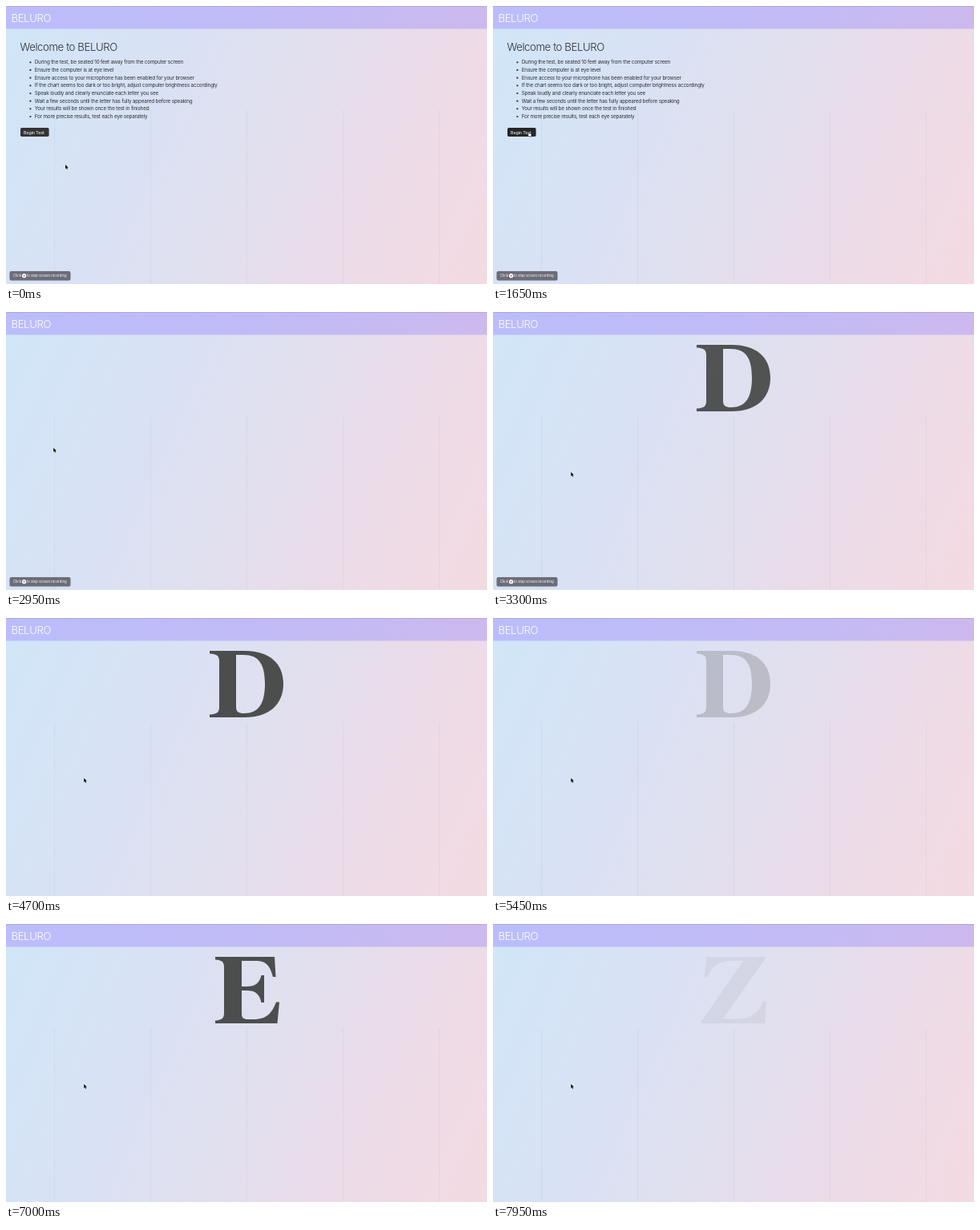
Animation of 600 by 347 pixels, one loop 8 s. Source, as an HTML page:

```html
<!DOCTYPE html>
<html lang="en">
<head>
<meta charset="utf-8">
<title>Vision test</title>
<style>
html, body { margin: 0; height: 100%; overflow: hidden; }
svg { display: block; width: 600px; height: 347px; font-family: Inter, "Open Sans", sans-serif; }
.title { font-size: 13.2px; font-weight: 300; letter-spacing: -.03em; }
.list { font-size: 6.3px; letter-spacing: -.024em; }
.button { font-size: 5.4px; letter-spacing: -.02em; }
.badge { font-size: 4.3px; }
</style>
</head>
<body>
<svg viewBox="0 0 600 347">
  <defs>
    <linearGradient id="sky" gradientUnits="userSpaceOnUse" x2="631" y2="278">
      <stop stop-color="#d0e6f8"/>
      <stop offset=".33" stop-color="#dae1f4"/>
      <stop offset=".5" stop-color="#e0e0ef"/>
      <stop offset=".7" stop-color="#eadcea"/>
      <stop offset="1" stop-color="#f4dae1"/>
    </linearGradient>
    <linearGradient id="bar">
      <stop stop-color="#bbbdfb"/>
      <stop offset=".5" stop-color="#c0bbf7"/>
      <stop offset="1" stop-color="#ccb9ee"/>
    </linearGradient>
  </defs>
  <rect width="600" height="347" fill="url(#sky)"/>
  <path d="M60.5 130V347M180.5 130V347M300.5 130V347M420.5 130V347M540.5 130V347" stroke="#556" stroke-opacity=".06"/>
  <rect width="600" height="28.5" fill="url(#bar)"/>
  <rect width="600" height=".7" fill="#667" opacity=".3"/>
  <text class="title" x="6.5" y="20" fill="#fff">BELURO</text>

  <g id="page" fill="#2b2d33">
    <text class="title" x="17.5" y="56">Welcome to BELURO</text>
    <g id="list" class="list"></g>
    <rect id="ring" x="17" y="151" width="37.6" height="13" rx="2.4" fill="none" stroke="#6a62e8" stroke-width="1.8"/>
    <rect id="button" x="18" y="152" width="35.6" height="11" rx="1.7"/>
    <text class="button" x="22" y="159.5" fill="#fff">Begin Test</text>
  </g>

  <path id="letter" fill="#4c4e4e" fill-rule="evenodd"/>

  <g id="badge">
    <rect x="4" y="330.7" width="77" height="12.6" rx="2.5" fill="#446" opacity=".15"/>
    <rect x="4.6" y="331" width="75.8" height="11.4" rx="2" fill="#6c6d78"/>
    <g class="badge" fill="#fff">
      <text x="9" y="338.3">Click</text>
      <circle cx="22.6" cy="336.7" r="2.6"/>
      <text x="26" y="338.3">to stop screen recording</text>
    </g>
    <circle cx="22.6" cy="336.7" r=".9" fill="#6c6d78"/>
  </g>

  <g id="cursor" stroke-linejoin="round">
    <path id="arrow" d="M0 0V5.3L1.2 4.2 2 6 3 5.6 2.2 3.8H3.8Z" fill="#111" stroke="#fff" stroke-width=".5" paint-order="stroke"/>
    <path id="hand" d="M.1.2Q.8-.5 1.3.4L1.7 2 4.2 2.5Q4.8 2.8 4.5 4L4.1 6H1.5L-.6 3.7Q-.4 2.9.6 3.5Z" fill="#fff" stroke="#111" stroke-width=".6"/>
  </g>
</svg>
<script>
const LOOP = 8000;
const $ = id => document.getElementById(id);
const lines = [
  "During the test, be seated 10 feet away from the computer screen",
  "Ensure the computer is at eye level",
  "Ensure access to your microphone has been enabled for your browser",
  "If the chart seems too dark or too bright, adjust computer brightness accordingly",
  "Speak loudly and clearly enunciate each letter you see",
  "Wait a few seconds until the letter has fully appeared before speaking",
  "Your results will be shown once the test in finished",
  "For more precise results, test each eye separately"
];
$("list").innerHTML = lines.map((line, i) => {
  const y = 72.4 + 9.67 * i;
  return `<circle cx="30.4" cy="${y - 2.1}" r="1.1"/><text x="35.7" y="${y}">${line}</text>`;
}).join("");

const glyphs = {
  D: "M254 41H298C329 41 346 57 346 82S329 124 298 124H254V120.5C263 120 266 118 266 111V54C266 47 263 45 254 44.5Z" +
     "M287 46V111C287 117 290 119 297 119C315 119 323 107 323 82S315 46 296 46Z",
  E: "M261 41H335L336.5 66H333C329 51 324 46 311 46H294V78H300C311 78 316 74 318.5 64H322V98H318.5C316 87 311 83 300 83H294V112" +
     "C294 117 296 119 302 119H308C324 119 331 113 337 97.5H341L338.5 124H261V120.5C269 120 272 118 272 111V54C272 47 269 45 261 44.5Z",
  Z: "M266 41H339V44L287 118.5H302C321 118.5 331 112 337 96.5H341L339 124H260V121.5L312 46H300C282 46 273 52 268 66H264Z"
};
// Start of fade-in and fade-out for each letter
const shows = [["D", 2950, 400, 5250, 300], ["E", 5550, 400, 7580, 300], ["Z", 7880, 400, 9000, 300]];
// Pointer path: time, x, y
const path = [[0, 74, 198], [50, 72.5, 196.5], [200, 72.5, 196.5], [1050, 46, 166],
  [1300, 43.5, 157], [2780, 43.5, 157], [3250, 97.2, 199.8], [LOOP, 97.2, 199.8]];

const ramp = (t, start, length) => Math.min(1, Math.max(0, (t - start) / length));
const swing = (t, start, length) => .5 - Math.cos(Math.PI * ramp(t, start, length)) / 2;

function pointer(t) {
  const i = path.findIndex(p => p[0] > t);
  const [t0, x0, y0] = path[i - 1], [t1, x1, y1] = path[i];
  const k = swing(t, t0, t1 - t0);
  return [x0 + (x1 - x0) * k, y0 + (y1 - y0) * k];
}

function draw(t) {
  const [x, y] = pointer(t);
  const hover = t < 2950 && x > 18 && x < 53.6 && y > 152 && y < 163;
  $("cursor").setAttribute("transform", `translate(${x} ${y})`);
  $("hand").style.display = hover ? "" : "none";
  $("arrow").style.display = hover ? "none" : "";

  const shade = 52 - 14 * ramp(t, 1150, 150);
  $("button").setAttribute("fill", `rgb(${shade},${shade},${shade + 2})`);
  $("ring").style.opacity = ramp(t, 2300, 150);
  $("page").style.opacity = 1 - swing(t, 2550, 400);
  $("badge").style.opacity = 1 - ramp(t, 4400, 300);

  const [name, enter, rise, leave, fall] = shows.findLast(s => t >= s[1]) || shows[0];
  $("letter").setAttribute("d", glyphs[name]);
  $("letter").style.opacity = swing(t, enter, rise) * (1 - swing(t, leave, fall));
}

const begin = performance.now();
function tick() {
  draw((performance.now() - begin) % LOOP);
  requestAnimationFrame(tick);
}
tick();
</script>
</body>
</html>
```
